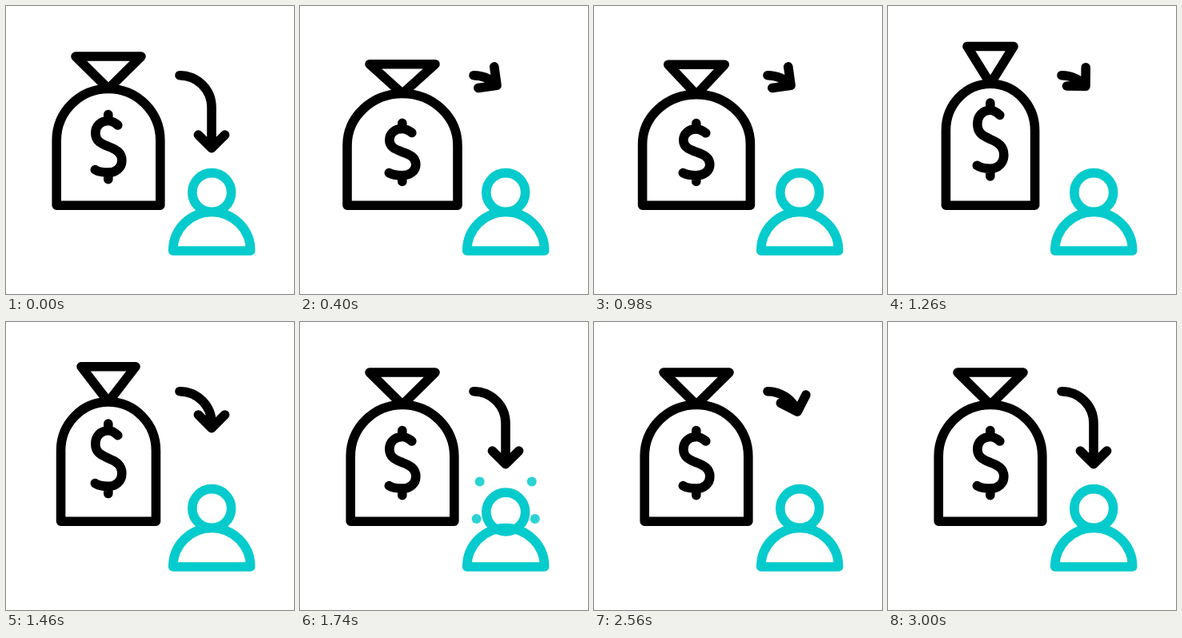
These frames come from a looping animation (360x360 px, 3320 ms). An HTML page with a canvas:

```html
<!DOCTYPE html>
<html lang="en">
<head>
<meta charset="utf-8">
<title>Money transfer</title>
<style>
  html, body { margin: 0; background: #fff; overflow: hidden; }
  canvas { display: block; }
</style>
</head>
<body>
<canvas id="stage" width="360" height="360"></canvas>
<script>
const ctx = document.getElementById('stage').getContext('2d');
const LOOP = 3320, TEAL = '#06cbcd', CX = 128, HEAD_X = 257.2;

const clamp = x => Math.min(1, Math.max(0, x));
const ramp = (t, from, to) => clamp((t - from) / (to - from));
const smooth = x => x * x * (3 - 2 * x);
const mix = (a, b, k) => a + (b - a) * k;

// Bag poses: [knot half width, knot y, neck y, half width, shoulder y, sign top, sign bottom]
const REST = [41, 63, 103.5, 64.8, 168, 135.5, 216.7];
const SQUASH = [41, 93, 122.3, 77.8, 188, 169, 225];
const STRETCH = [28.5, 50, 97, 55.2, 155, 120.5, 212.8];
const BAG_KEYS = [[230, REST], [760, SQUASH], [1240, STRETCH], [1740, REST]];

// The S of the dollar sign and its two stubs, in a box from y -1 to 1
const SIGN = new Path2D(
  'M12 -.667C8.5 -.74 4.5 -.802 0 -.802C-9.5 -.802 -16 -.642 -16 -.42' +
  'C-16 -.173 -8.5 -.1 0 -.012C9.5 .074 17 .173 17 .42C17 .642 9.5 .79 0 .79' +
  'C-6.5 .79 -12.5 .765 -16.5 .704M0 -1V-.802M0 .79V1');

function bagPose(t) {
  let pose = REST;
  for (let i = 1; i < BAG_KEYS.length; i++) {
    const [t0, a] = BAG_KEYS[i - 1], [t1, b] = BAG_KEYS[i];
    if (t >= t0 && t < t1) pose = a.map((v, j) => mix(v, b[j], ramp(t, t0, t1)));
  }
  return pose;
}

function drawBag(t) {
  const [knot, knotY, neckY, half, shoulderY, top, bottom] = bagPose(t);
  ctx.beginPath();
  ctx.moveTo(CX, neckY);
  ctx.lineTo(CX - knot, knotY);
  ctx.lineTo(CX + knot, knotY);
  ctx.closePath();
  ctx.moveTo(CX - half, 249.2);
  ctx.lineTo(CX - half, shoulderY);
  ctx.ellipse(CX, shoulderY, half, shoulderY - neckY, 0, Math.PI, 2 * Math.PI);
  ctx.lineTo(CX + half, 249.2);
  ctx.closePath();
  ctx.stroke();

  const sign = new Path2D();
  sign.addPath(SIGN, new DOMMatrix([1, 0, 0, (bottom - top) / 2, CX - .2, (top + bottom) / 2]));
  ctx.stroke(sign);
}

// Arrow length as a share: 1 is full, 0 is pulled in
function arrowReach(t) {
  if (t < 1220) return 1 - smooth(ramp(t, 220, 400));
  if (t < 2000) return smooth(ramp(t, 1220, 1740));
  if (t < 2400) return 1 - smooth(ramp(t, 2067, 2240));
  return smooth(ramp(t, 2400, 2980));
}

function drawArrow(t) {
  const R = 40, x0 = 217, y0 = 126.7, arc = R * Math.PI / 2;
  const s = mix(32.5, arc + 51, arrowReach(t));
  const a = Math.min(s, arc) / R;
  const x = x0 + R * Math.sin(a);
  const y = y0 - R * Math.cos(a) + Math.max(0, s - arc);
  const heading = mix(37, 90, clamp((s - 32.5) / (arc - 32.5)) ** .6) * Math.PI / 180;
  const prong = side => {
    const d = heading + side * Math.PI / 4;
    return [x - 23.5 * Math.cos(d), y - 23.5 * Math.sin(d)];
  };
  ctx.beginPath();
  ctx.arc(x0, y0, R, -Math.PI / 2, a - Math.PI / 2);
  ctx.lineTo(x, y);
  ctx.moveTo(...prong(-1));
  ctx.lineTo(x, y);
  ctx.lineTo(...prong(1));
  ctx.stroke();
}

function drawDots(t) {
  const k = (t - 1740) / 360;
  ctx.globalAlpha = .85 * ramp(t, 1620, 1740) * (1 - ramp(t, 2090, 2190));
  for (const side of [-1, 1]) {
    for (const [dx, y] of [[mix(32.5, 43.5, k), mix(199.5, 189, k)],
                           [mix(36.5, 53, k), mix(246, 247, k)]]) {
      ctx.beginPath();
      ctx.arc(HEAD_X + side * dx, y, 6, 0, 2 * Math.PI);
      ctx.fill();
    }
  }
  ctx.globalAlpha = 1;
}

const nod = (t, from, to) => Math.sin(Math.PI * ramp(t, from, to));

function drawPerson(t) {
  const dip = 4.5 * (nod(t, 1620, 1860) + nod(t, 2740, 2970));
  ctx.beginPath();
  ctx.arc(HEAD_X, 233 + dip, 24.4, 0, 2 * Math.PI);
  ctx.closePath();
  ctx.moveTo(HEAD_X - 48.5, 306);
  ctx.arc(HEAD_X, 306, 48.5, Math.PI, 2 * Math.PI);
  ctx.closePath();
  ctx.stroke();
}

function draw(now) {
  const t = now % LOOP;
  ctx.fillStyle = '#fff';
  ctx.fillRect(0, 0, 360, 360);
  ctx.lineWidth = 11.6;
  ctx.lineCap = ctx.lineJoin = 'round';
  ctx.strokeStyle = '#000';
  drawBag(t);
  drawArrow(t);
  ctx.strokeStyle = ctx.fillStyle = TEAL;
  drawDots(t);
  drawPerson(t);
}

const start = performance.now();
function tick() {
  draw(performance.now() - start);
  requestAnimationFrame(tick);
}
tick();
</script>
</body>
</html>
```
